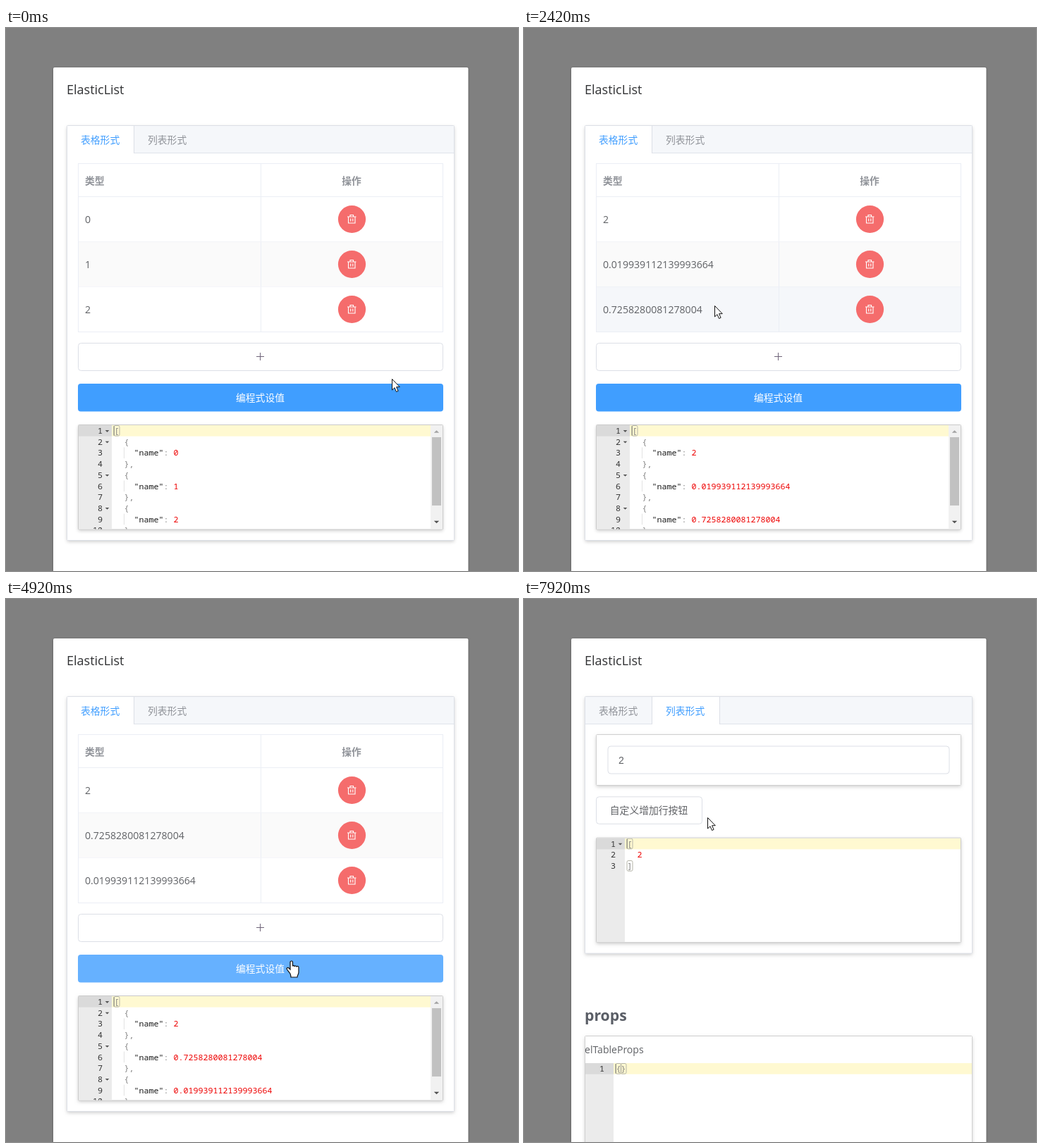
Animation of 726x771 px, one loop 8000 ms. Source, as an HTML page with a canvas:

```html
<!DOCTYPE html>
<html lang="zh">
<head>
<meta charset="utf-8">
<style>
  html, body { margin: 0; width: 100%; height: 100%; overflow: hidden; background: #808080; }
  canvas { display: block; }
</style>
</head>
<body>
<canvas id="stage" width="726" height="771"></canvas>
<script>
const ctx = document.getElementById('stage').getContext('2d');
const LOOP = 8000, FRAME = 1000 / 12;
const SANS = '"Open Sans", "Noto Sans CJK SC", "Noto Sans CJK", sans-serif';
const CJK = '"Noto Sans CJK SC", "Noto Sans CJK", sans-serif';
const MONO = '11.67px "Noto Sans Mono", monospace';
const BLUE = '#409eff', GREY = '#606266', MUTED = '#909399', LINE = '#dcdfe6', PALE = '#ebeef5';
const A = '0.019939112139993664', B = '0.7258280081278004';
const LIST_START = 6060, SET_VALUE = 5160;

// Row contents over time; "sorting" steps slide rows without updating the JSON.
const steps = [
  { t: 0, rows: ['0', '1', '2'] },
  { t: 580, rows: ['1', '2'] },
  { t: 910, rows: ['2'] },
  { t: 1660, rows: ['2', A] },
  { t: 2240, rows: ['2', A, B] },
  { t: 3240, rows: ['2', B, A], sorting: true },
  { t: 3420, rows: [B, '2', A], sorting: true },
  { t: 3660, rows: [B, '2', A] },
  { t: 4042, rows: ['2', B, A], sorting: true },
  { t: 4490, rows: ['2', B, A] },
  { t: SET_VALUE, rows: ['10', '11', '12'] },
  { t: LIST_START, rows: ['0', '1', '2'] },
  { t: 7160, rows: ['1', '2'] },
  { t: 7490, rows: ['2'] }
];

const drags = [
  { from: 2740, to: 3660, item: B, x: 138, y: 382, rowY: 399 },
  { from: 3820, to: 4490, item: '2', x: 145, y: 318, rowY: 335 }
];

// time, x, y, pointer shape from then on
const pointerPath = [
  [0, 547, 498, 'arrow'], [480, 492, 272, 'hand'], [910, 490, 274, 'arrow'],
  [990, 488, 276, 'arrow'], [1090, 488, 276, 'arrow'], [1420, 367, 310, 'hand'],
  [1660, 368, 311, 'arrow'], [1900, 368, 317, 'arrow'], [2080, 366, 396, 'hand'],
  [2240, 366, 402, 'arrow'], [2660, 138, 382, 'arrow'], [2740, 138, 382, 'drag'],
  [3167, 138, 357, 'drag'], [3420, 142, 298, 'drag'], [3580, 145, 272, 'drag'],
  [3660, 145, 274, 'arrow'], [3820, 145, 318, 'drag'], [4083, 154, 265, 'drag'],
  [4420, 152, 258, 'drag'], [4490, 152, 260, 'arrow'], [4850, 400, 508, 'hand'],
  [4990, 410, 520, 'hand'], [5090, 410, 520, 'hand'], [5250, 405, 518, 'arrow'],
  [5667, 232, 170, 'hand'], [5750, 231, 165, 'hand'], [6060, 230, 162, 'hand'],
  [6180, 260, 166, 'arrow'], [6583, 570, 214, 'text'], [6667, 583, 212, 'text'],
  [6830, 612, 204, 'hand'], [6990, 617, 203, 'hand'], [7300, 617, 203, 'hand'],
  [7320, 616, 204, 'hand'], [7490, 616, 204, 'arrow'], [7910, 260, 310, 'arrow']
];

function pointerAt(t) {
  let i = pointerPath.length - 1;
  while (pointerPath[i][0] > t) i--;
  const [t0, x0, y0, shape] = pointerPath[i];
  const [t1, x1, y1] = pointerPath[i + 1] || [LOOP, x0, y0];
  const k = (t - t0) / (t1 - t0);
  return { x: x0 + (x1 - x0) * k, y: y0 + (y1 - y0) * k, shape };
}

function rect(x, y, w, h, fill) {
  ctx.fillStyle = fill;
  ctx.fillRect(x, y, w, h);
}

function box(x, y, w, h, radius, fill, border) {
  ctx.beginPath();
  ctx.roundRect(x, y, w, h, radius);
  if (fill) { ctx.fillStyle = fill; ctx.fill(); }
  if (border) { ctx.strokeStyle = border; ctx.lineWidth = 1; ctx.stroke(); }
}

function panel(x, y, w, h, border) {
  ctx.save();
  ctx.shadowColor = 'rgba(0,0,0,.2)';
  ctx.shadowBlur = 5;
  ctx.shadowOffsetY = 2;
  box(x, y, w, h, 1, '#fff');
  ctx.restore();
  box(x, y, w, h, 1, null, border);
}

function text(str, x, y, color, font, align = 'left') {
  ctx.font = font;
  ctx.fillStyle = color;
  ctx.textAlign = align;
  ctx.fillText(str, x, y);
}

function path(d, stroke, fill, width = 1) {
  const p = new Path2D(d);
  if (fill) { ctx.fillStyle = fill; ctx.fill(p); }
  ctx.strokeStyle = stroke;
  ctx.lineWidth = width;
  if (stroke) ctx.stroke(p);
}

function at(x, y, draw) {
  ctx.save();
  ctx.translate(x, y);
  draw();
  ctx.restore();
}

function trashButton(y, fill) {
  at(490.5, y, () => {
    ctx.beginPath();
    ctx.arc(0, 0, 19.6, 0, 7);
    ctx.fillStyle = fill;
    ctx.fill();
    path('M-6.5-3.5H6M-2.5-4V-6H2V-4M-5-3V5.5H4.5V-3M-1.8-1V3M1.3-1V3', '#fff', null, 1.1);
  });
}

function tableRow(item, y, h, fill, trash) {
  rect(103, y - h / 2, 516, h, fill);
  rect(102, y + h / 2 - .5, 518, 1, PALE);
  rect(361, y - h / 2, 1, h, PALE);
  text(item, 112, y + 5, GREY, '14.1px ' + SANS);
  if (trash) trashButton(y, trash);
}

function ghostRow(drag, p) {
  const dx = p.x - drag.x, y = drag.rowY + p.y - drag.y;
  const glow = ctx.createLinearGradient(0, y - 32, 0, y + 32);
  glow.addColorStop(0, 'rgba(255,255,255,0)');
  glow.addColorStop(.4, 'rgba(255,255,255,.55)');
  glow.addColorStop(1, 'rgba(255,255,255,0)');
  rect(102 + dx, y - 32, 518 - Math.max(dx, 0), 64, glow);
  ctx.save();
  ctx.globalAlpha = .55;
  text(drag.item, 112 + dx, y + 5, GREY, '14.1px ' + SANS);
  ctx.globalAlpha = .22;
  ctx.translate(dx, 0);
  trashButton(y, '#f56c6c');
  ctx.restore();
}

function triangle(x, y, half, dir, color) {
  path(`M${x - half} ${y - dir * half / 2}h${2 * half}l${-half} ${dir * half}z`, null, color);
}

function editor(x, y, w, h, lines) {
  const LINE_H = 15.7, CHAR = 7;
  const scrolls = lines.length > 9;
  const gutter = x + (scrolls ? 47 : 40), left = gutter + 3.5;
  ctx.save();
  ctx.beginPath();
  ctx.rect(x, y, w, h);
  ctx.clip();
  rect(x, y, gutter - x, h, '#ebebeb');
  rect(x, y, gutter - x, LINE_H, '#dadada');
  rect(gutter, y, w, LINE_H, '#fff9d1');
  const bracket = (row, col) =>
    box(left + col * CHAR - .5, y + row * LINE_H + .5, CHAR + 1, LINE_H - 1, 2, null, '#b5b5a8');
  lines.forEach((line, i) => {
    const base = y + i * LINE_H + 12;
    text(i + 1, gutter - 13, base, '#333', MONO, 'right');
    if (/[[{]$/.test(line)) triangle(gutter - 6.5, base - 3.5, 2.8, 1, '#555');
    if (line.startsWith('    ')) rect(Math.round(left + 13), y + i * LINE_H, 1, LINE_H, '#e3e3e3');
    for (const m of line.matchAll(/"name"|\d[\d.]*|\S/g)) {
      const color = m[0][0] === '"' ? '#1a1a1a' : /\d/.test(m[0]) ? '#ee0000' : '#808080';
      text(m[0], left + m.index * CHAR, base, color, MONO);
    }
  });
  bracket(0, 0);
  bracket(lines.length - 1, lines.length > 1 ? 0 : 1);
  rect(left - 1, y + 1, 1.5, LINE_H - 2, '#9c9c8c');
  if (scrolls) {
    rect(x + w - 17, y, 17, h, '#f1f1f1');
    rect(x + w - 15, y + 17, 13, 97, '#c1c1c1');
    triangle(x + w - 8.5, y + 9, 3.7, -1, '#a3a3a3');
    triangle(x + w - 8.5, y + h - 10, 3.7, 1, '#505050');
  }
  ctx.restore();
}

function jsonEditor(y, lines) {
  panel(102.5, y, 517, 148.5, '#ccc');
  editor(103, y + .5, 516, 147.5, lines);
}

function drawTable(t, step, index, p) {
  const saved = steps.slice(0, index + 1).filter(s => !s.sorting).pop().rows;
  const before = step.sorting ? steps[index - 1].rows : step.rows;
  const slide = Math.min(1, (t - step.t) / 190);
  const drag = drags.find(d => t >= d.from && t < d.to);
  const n = step.rows.length, rowH = n > 1 ? 64 : 48, bottom = 239.5 + n * rowH;

  box(102.5, 192.5, 517, bottom - 192.5, 0, '#fff', PALE);
  rect(361, 193, 1, 47, PALE);
  step.rows.forEach((item, i) => {
    const from = before.indexOf(item);
    const y = 239.5 + rowH * (from + (i - from) * slide + .5);
    const over = p.x > 102 && p.x < 620 && Math.abs(p.y - y) < rowH / 2;
    const lit = drag ? drag.item === item : over;
    const fill = lit ? '#f5f7fa' : saved.indexOf(item) === 1 ? '#fafafa' : '#fff';
    const hot = !drag && Math.hypot(p.x - 490, p.y - y) < 20;
    tableRow(item, y, rowH, fill, n > 1 && (hot ? '#f78989' : '#f56c6c'));
  });
  rect(102, 239, 518, 1, PALE);
  rect(102, 192, 1, bottom - 192, PALE);
  rect(619, 192, 1, bottom - 192, PALE);
  text('类型', 112, 222, MUTED, 'bold 13.8px ' + CJK);
  text('操作', 490, 222, MUTED, 'bold 13.8px ' + CJK, 'center');

  const within = top => !drag && p.x > 102 && p.x < 620 && p.y > top && p.y < top + 39;
  const addHot = within(bottom + 16);
  box(102.5, bottom + 16, 517, 39, 4, addHot ? '#f2f8ff' : '#fff', addHot ? '#cfe3f5' : LINE);
  at(360.5, bottom + 35, () => path('M-5.5 0H5.5M0-5.5V5.5', addHot ? '#7fb2e6' : '#70657a'));
  const setHot = within(bottom + 74) || t >= SET_VALUE;
  box(102, bottom + 73.5, 518, 39.5, 4, setHot ? '#66b1ff' : BLUE);
  text('编程式设值', 360.5, bottom + 98.5, '#fff', '500 13.8px ' + CJK, 'center');

  const lines = ['['];
  saved.forEach((item, i) =>
    lines.push('  {', `    "name": ${item}`, i < saved.length - 1 ? '  },' : '  }'));
  jsonEditor(bottom + 132, [...lines, ']']);
  if (drag) ghostRow(drag, p);
  return bottom + 296;
}

function drawList(rows, p) {
  rows.forEach((item, i) => {
    const y = 192.5 + i * 88.4;
    const hot = p.shape === 'text' && p.y > y + 16 && p.y < y + 56;
    panel(102.5, y, 517, 72, '#d0d0d0');
    box(119, y + 16.5, 484, 39, 4, '#fff', hot ? '#b8bcc4' : LINE);
    text(item, 134, y + 41, GREY, '14px "Liberation Sans", sans-serif');
    if (rows.length > 1) at(618.5, y + .8, () => {
      ctx.beginPath();
      ctx.arc(0, 0, 12.7, 0, 7);
      ctx.fillStyle = '#fff';
      ctx.fill();
      ctx.strokeStyle = GREY;
      ctx.lineWidth = 2;
      ctx.stroke();
      path('M-4-4L4 4M4-4L-4 4', GREY, null, 1.8);
    });
  });
  const y = 192.5 + rows.length * 88.35;
  box(102.5, y, 150, 38.5, 4, '#fff', LINE);
  text('自定义增加行按钮', 177, y + 24.5, GREY, '13.8px ' + CJK, 'center');
  const items = rows.map((r, i) => `  ${r}${i < rows.length - 1 ? ',' : ''}`);
  jsonEditor(y + 58.3, ['[', ...items, ']']);
  return y + 222.3;
}

function drawPointer({ x, y, shape }) {
  at(Math.round(x), Math.round(y), () => {
    if (shape === 'hand') {
      path('M0 0c-1.5 0-2 1-2 2v10l-2-2c-1-1-3-.5-3 1 0 1 3 4 5 7 1 3 1 5 1 5h9c0-3 2-4 2-7v-7' +
        'c0-2-3-2-3-.5 0-2-3.2-2-3.2-.5 0-2-2.3-2-2.3-.4V2c0-1-.5-2-1.5-2z', '#111', '#fff', 1.2);
    } else if (shape === 'text') {
      path('M-3.5-6.5h2.5l1 1 1-1H3.5M0-5.5V6.5M-3.5 7.5h2.5l1-1 1 1H3.5', '#111', null, 1.2);
    } else {
      if (shape === 'drag') {
        ctx.setLineDash([1, 1]);
        path('M3.5 14.5h10v8h-10z', '#111', '#fff');
        ctx.setLineDash([]);
      }
      path('M.5.5V16l3.5-3.3 2.5 5.8 2.6-1.1-2.5-5.7h4.7z', '#111', '#fff');
    }
  });
}

function draw(t) {
  const p = pointerAt(t);
  let index = steps.length - 1;
  while (steps[index].t > t) index--;
  const step = steps[index], isList = t >= LIST_START;
  const n = step.rows.length;
  const cardBottom = isList ? 414.8 + n * 88.35 : 535.5 + n * (n > 1 ? 64 : 48);

  rect(0, 0, 726, 771, '#808080');
  ctx.save();
  ctx.shadowColor = 'rgba(0,0,0,.35)';
  ctx.shadowBlur = 3;
  ctx.shadowOffsetY = 1;
  box(67, 56, 588.5, 760, 2, '#fff');
  ctx.restore();
  text('ElasticList', 86, 94, '#303133', '18px ' + SANS);

  panel(86.5, 138.5, 549, cardBottom - 138.5, LINE);
  rect(87, 139, 548, 38, '#f5f7fa');
  rect(87, 177, 548, 1, '#e0e4eb');
  if (isList) {
    rect(181, 139, 97, 39, LINE);
    rect(182, 139, 95, 39, '#fff');
  } else {
    rect(87, 139, 95, 39, LINE);
    rect(87, 139, 94, 39, '#fff');
  }
  text('表格形式', 106, 164, isList ? MUTED : BLUE, '13.8px ' + CJK);
  text('列表形式', 201, 164, t > 5800 ? BLUE : MUTED, '13.8px ' + CJK);

  const bottom = isList ? drawList(step.rows, p) : drawTable(t, step, index, p);
  text('props', 86, bottom + 95.5, '#5a5e66', 'bold 21.2px ' + SANS);
  const propsTop = Math.round(bottom + 117) + .5;
  panel(86.5, propsTop, 549, 200, '#d0d0d0');
  text('elTableProps', 86, propsTop + 24, GREY, '14.05px ' + SANS);
  editor(87, propsTop + 38.5, 548, 160, ['{}']);

  drawPointer(p);
}

function tick() {
  const t = performance.now() % LOOP;
  draw(Math.floor((t + 4) / FRAME) % 96 * FRAME);
  requestAnimationFrame(tick);
}
tick();
</script>
</body>
</html>
```
